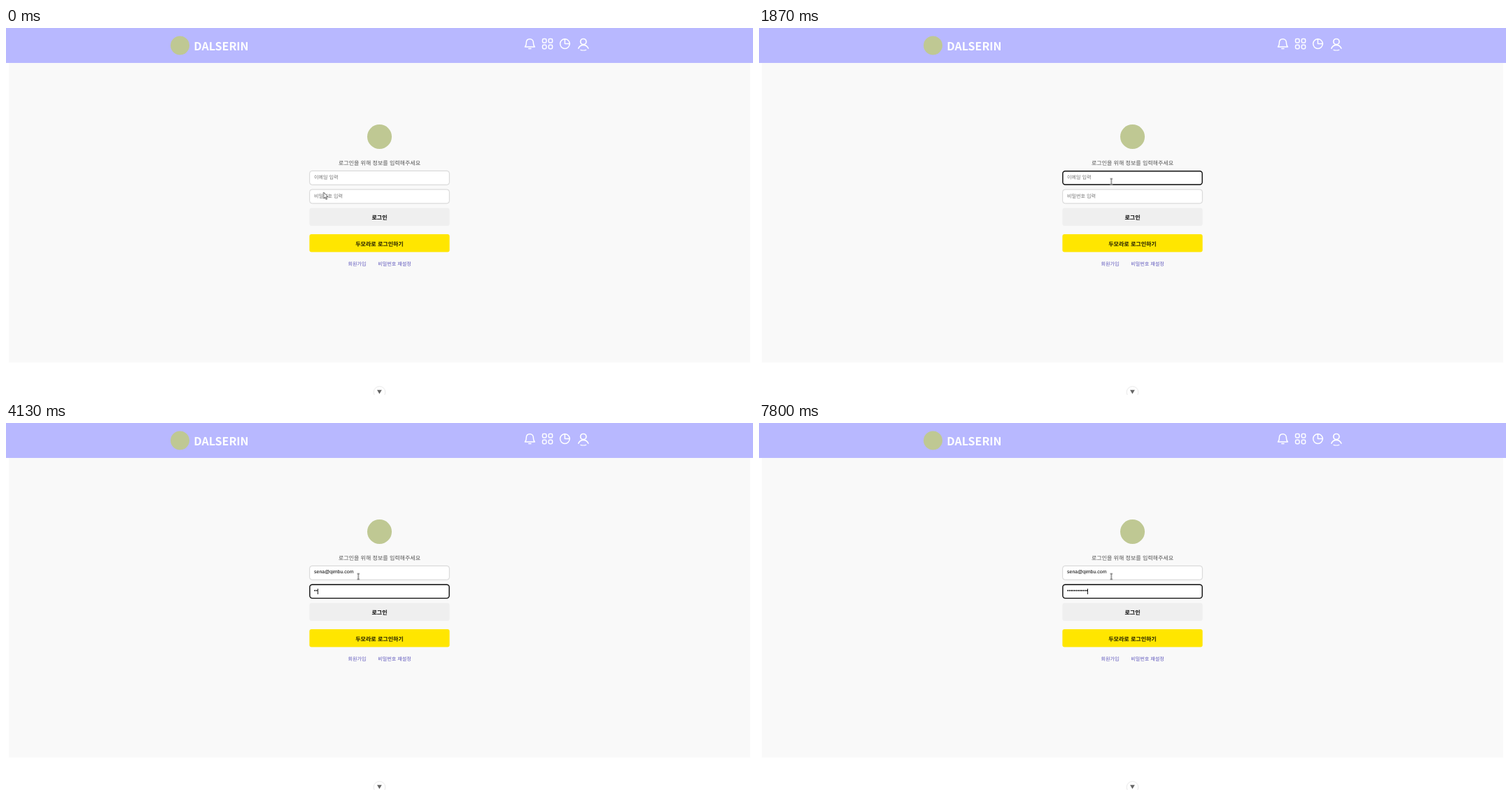
An HTML page for the animation above (8 s loop, 1067 by 525 pixels).

```html
<!DOCTYPE html>
<html lang="ko">
<head>
<meta charset="utf-8">
<title>로그인</title>
<style>
html, body { margin: 0; width: 100%; height: 100%; overflow: hidden; background: #fff; }
body { position: relative; text-rendering: geometricPrecision; }
svg { position: absolute; left: 0; top: 0; display: block; }
text { font: 8px "Noto Sans CJK KR", "Noto Sans CJK", sans-serif; }
.mid { text-anchor: middle; }
.bold { font-weight: 700; }
.brand { font-size: 16px; font-weight: 700; fill: #fff; }
.hint { font-size: 7.1px; fill: #757575; }
.link { font-size: 7.1px; fill: #6059bd; }
.icon { fill: none; stroke: #fff; stroke-width: 1.5; stroke-linecap: round; stroke-linejoin: round; }
.field { fill: #fff; stroke: #c8c8c8; stroke-width: .8; }
.ring { fill: none; stroke: #101010; stroke-width: 1.4; }

/* typed text: the right border is the caret */
.typed {
  position: absolute; left: 440px; width: 0; height: 8px;
  overflow: hidden; white-space: nowrap; color: #000;
  font: 7px/8px "Liberation Sans", Arial, sans-serif;
  border-right: 1px solid transparent;
}
.mail { top: 210px; }
.pass { top: 237px; }

.hint, .ring, .typed, .arrow, .beam { animation: 8s step-end infinite; }
.mail { animation-name: mail; }
.pass { animation-name: pass, passCaret; }
.mailHint { animation-name: mailHint; }
.passHint { animation-name: passHint; }
.mailRing { animation-name: mailRing; }
.passRing { animation-name: passRing; }
.arrow { animation-name: arrow; }
.beam { animation-name: beam; }

@keyframes mail {
  0% { width: 0; border-color: transparent; }
  15.875% { width: 0; border-color: #222; }
  23.375% { width: 0; border-color: transparent; }
  28.375% { width: 56.6px; border-color: #222; }
  35.875%, 100% { width: 56.6px; border-color: transparent; }
}
@keyframes pass {
  0% { width: 0; }
  49.125% { width: .35em; }
  51.625% { width: .7em; }
  55.875% { width: 1.05em; }
  57.5% { width: 1.4em; }
  60% { width: 1.75em; }
  61.625% { width: 2.1em; }
  65.875% { width: 2.45em; }
  69.125% { width: 2.8em; }
  72.5% { width: 3.15em; }
  75.875% { width: 3.5em; }
  79.125% { width: 3.85em; }
  84.125%, 100% { width: 4.2em; }
}
@keyframes passCaret {
  0%, 47.5%, 90.875% { border-color: transparent; }
  40.875%, 49.125%, 97.5%, 100% { border-color: #222; }
}
@keyframes mailHint { 0% { opacity: 1; } 28.375%, 100% { opacity: 0; } }
@keyframes passHint { 0% { opacity: 1; } 49.125%, 100% { opacity: 0; } }
@keyframes mailRing { 0% { opacity: 0; } 15.875% { opacity: 1; } 40.875%, 100% { opacity: 0; } }
@keyframes passRing { 0% { opacity: 0; } 40.875%, 100% { opacity: 1; } }
@keyframes arrow {
  0% { transform: translate(453.6px, 235px); opacity: 1; }
  .875% { transform: translate(466px, 232.5px); opacity: 1; }
  1.7125% { transform: translate(481px, 229px); opacity: 1; }
  2.5375% { transform: translate(491px, 226.5px); opacity: 1; }
  3.375% { transform: translate(494.6px, 225.5px); opacity: 1; }
  12.5%, 100% { transform: translate(494.6px, 225.5px); opacity: 0; }
}
@keyframes beam {
  0% { transform: translate(501px, 221px); opacity: 0; }
  12.5% { transform: translate(501px, 221px); opacity: 1; }
  13.375%, 100% { transform: translate(503.3px, 219.6px); opacity: 1; }
}
</style>
</head>
<body>
<svg width="1067" height="525" viewBox="0 0 1067 525">
  <rect x="4" y="50" width="1059" height="428.5" fill="#f9f9f9"/>
  <rect width="1067" height="50" fill="#b8b8ff"/>

  <circle cx="248.5" cy="25" r="13.5" fill="#bfc893"/>
  <text class="brand" x="268.3" y="32">DALSERIN</text>

  <g class="icon">
    <path d="M741.3 27H755.2C753.6 25.4 753.3 24 753.3 21.2C753.3 18 751.2 15.8 748.2 15.8S743.2 18 743.2 21.2C743.2 24 742.9 25.4 741.3 27ZM746.7 29.4H749.8"/>
    <rect x="766.4" y="15.6" width="5.4" height="5.4" rx="1.6"/>
    <rect x="775.1" y="15.6" width="5.4" height="5.4" rx="1.6"/>
    <rect x="766.4" y="24.3" width="5.4" height="5.4" rx="1.6"/>
    <rect x="775.1" y="24.3" width="5.4" height="5.4" rx="1.6"/>
    <circle cx="798.3" cy="22.6" r="6.8"/>
    <path d="M798.3 15.8V22.6H805.1"/>
    <circle cx="824.7" cy="19.6" r="4.1" stroke-width="1.7"/>
    <path d="M817.7 29C819.2 25.8 821.8 24.3 824.7 24.3S830.2 25.8 831.7 29" stroke-width="1.7"/>
    <path d="M820.8 31.4Q824.7 32.6 828.6 31.4" stroke-width="1.2"/>
  </g>

  <circle cx="533.5" cy="155.5" r="17.5" fill="#bfc893"/>
  <text class="mid" x="533.5" y="195.5" fill="#555">로그인을 위해 정보를 입력해주세요</text>

  <rect class="field" x="433.7" y="204.4" width="199.6" height="19.9" rx="3.5"/>
  <rect class="field" x="433.7" y="231" width="199.6" height="19.9" rx="3.5"/>
  <text class="hint mailHint" x="440" y="216.1">이메일 입력</text>
  <text class="hint passHint" x="440" y="243.1">비밀번호 입력</text>
  <rect class="ring mailRing" x="433.9" y="204.7" width="199.2" height="19.3" rx="3.5"/>
  <rect class="ring passRing" x="433.9" y="231.3" width="199.2" height="19.3" rx="3.5"/>

  <rect x="433.4" y="257.4" width="200.2" height="25.5" rx="3" fill="#efefef"/>
  <text class="mid bold" x="533.5" y="274">로그인</text>
  <rect x="433.4" y="295" width="200.2" height="25.5" rx="3" fill="#ffe600"/>
  <text class="mid bold" x="533.5" y="311.6" fill="#1c1a00">두모라로 로그인하기</text>

  <text class="link mid" x="501.5" y="340.2">회원가입</text>
  <text class="link mid" x="555" y="340.2">비밀번호 재설정</text>

  <circle cx="533.5" cy="521" r="8.3" fill="#fff" stroke="#e6e6e6" stroke-width=".9"/>
  <path d="M530 517.7H536.8L533.4 523.5Z" fill="#666"/>
</svg>

<div class="typed mail">sena@qimbu.com</div>
<div class="typed pass">••••••••••••</div>

<svg width="1067" height="525" viewBox="0 0 1067 525">
  <path class="arrow" d="M0 0V9L2.1 7.1L3.6 10.3L5 9.7L3.6 6.5H6.4Z" fill="#fff" stroke="#333" stroke-width=".8" stroke-linejoin="round"/>
  <g class="beam" fill="none">
    <path d="M-1.7 -4H1.7M0 -4V4M-1.7 4H1.7" stroke="#fff" stroke-width="1.8"/>
    <path d="M-1.7 -4H1.7M0 -4V4M-1.7 4H1.7" stroke="#333" stroke-width=".9"/>
  </g>
</svg>
</body>
</html>
```
